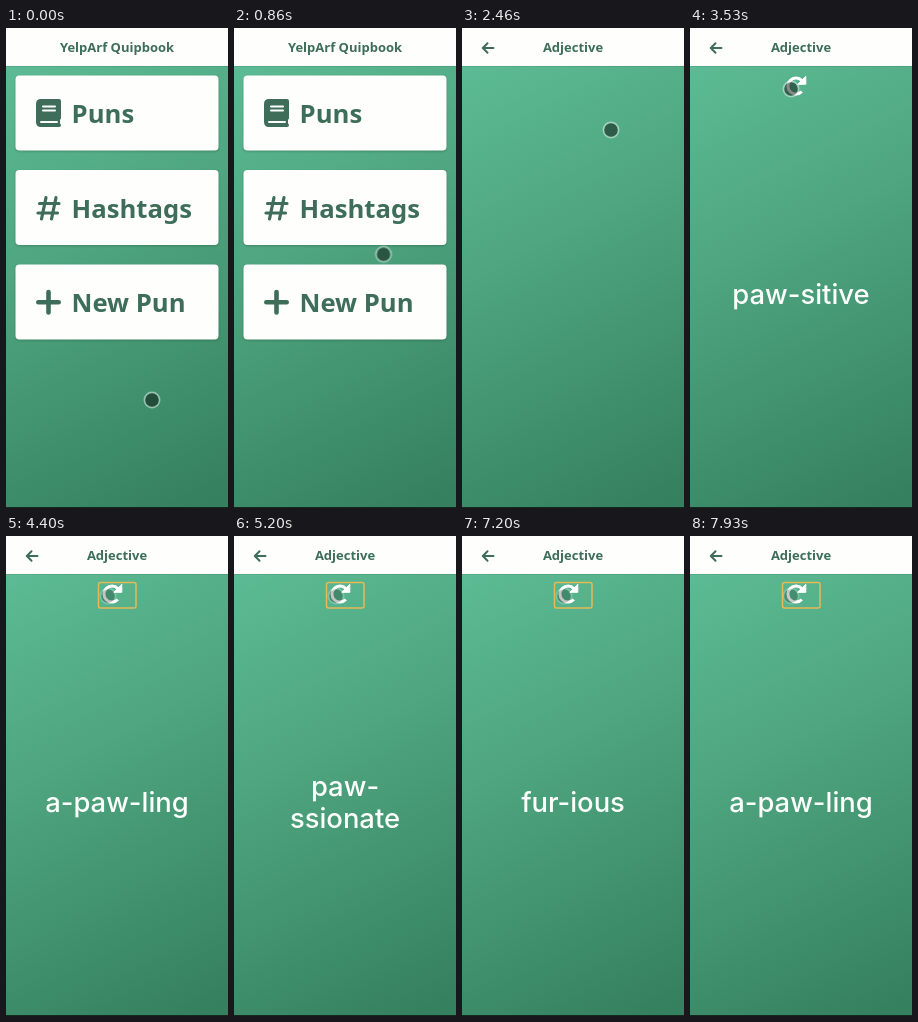
An HTML page that plays this animation: 222 px wide and 480 px high, repeating every 8000 ms.

```html
<!DOCTYPE html>
<html lang="en">
<head>
<meta charset="utf-8">
<title>Pun browser</title>
<style>
  html, body { margin: 0; width: 100%; height: 100%; overflow: hidden; }
  body { background: linear-gradient(153deg, #5dbd96 3%, #4fa680 42%, #35805f 97%); }
  svg { display: block; width: 100%; height: 100%; }
  .title, .label { font-family: "Noto Sans", sans-serif; font-weight: 700; fill: #3e6e59; }
  .title { font-size: 13px; text-anchor: middle; }
  .label { font-size: 25.7px; }
  .word { font: 500 27.4px Inter, sans-serif; fill: #fdfffd; text-anchor: middle; }
  .card { fill: #fefffc; filter: drop-shadow(0 1px 1px #0003); }
  .solid { fill: #3e6e59; }
  .line { fill: none; stroke: #3e6e59; stroke-linecap: round; stroke-linejoin: round; }
</style>
</head>
<body>
<svg id="stage" viewBox="0 0 222 480">
  <defs>
    <g id="book">
      <path class="solid" d="M35 71H53q2 0 2 2V90q0 1-1 1.700v4q1 .3 1 1.600q0 1.700-2 1.700H35q-5 0-5-5V76q0-5 5-5Z"/>
      <path d="M37 78.500H49M37 82.500H49M35 94H51" fill="none" stroke="#fefffc" stroke-width="2" stroke-linecap="round"/>
    </g>
    <path id="hash" class="line" stroke-width="3.200" d="M40 169.500L35.500 191M50 169.500L45.500 191M33.500 175.500H53M32 185H51.500"/>
    <path id="plus" class="line" stroke-width="4.600" d="M42.500 264V284.500M32.300 274.200H52.700"/>
    <path id="back" class="line" stroke-width="2" d="M31.500 20H21M25.500 15.300L20.800 20L25.500 24.700"/>
  </defs>
  <rect width="222" height="38" fill="#fefffc"/>
  <path d="M0 38.300H222" stroke="#0002" stroke-width=".8"/>
  <path d="M0 479.500H222" stroke="#12291f"/>
  <g id="home"></g>
  <g id="list"></g>
  <g id="detail"></g>
  <g id="pun">
    <path d="M111.800 52.600A8 8 0 1 0 111.800 63.500" fill="none" stroke="#fff" stroke-width="3"/>
    <path d="M115.800 48.300V56.300H107.600Z" fill="#fff" stroke="#fff" stroke-linejoin="round"/>
  </g>
  <rect id="focus" x="92.500" y="46.500" width="37.500" height="25.500" rx="2" fill="none" stroke="#e6b955" stroke-width="1.500"/>
  <g id="words"></g>
  <g id="cursor">
    <circle r="7" fill="#000" fill-opacity=".46"/>
    <circle r="7.600" fill="none" stroke="#fff" stroke-opacity=".45" stroke-width="1.700"/>
  </g>
</svg>
<script>
const LOOP = 8000;
const CARD_STEP = 94.5;
const $ = id => document.getElementById(id);

const title = text => `<text class="title" x="111" y="24">${text}</text>`;
const icon = id => `<use href="#${id}"/>`;

const card = (text, row, x) => `
  <rect class="card" x="9.5" y="${47.5 + row * CARD_STEP}" width="203" height="75" rx="4"/>
  <text class="label" x="${x}" y="${95 + row * CARD_STEP}">${text}</text>`;

const cards = (labels, x) => labels.map((text, row) => card(text, row, x)).join("");

$("home").innerHTML = title("YelpArf Quipbook") + cards(["Puns", "Hashtags", "New Pun"], 65.5)
  + ["book", "hash", "plus"].map(icon).join("");
$("list").innerHTML = title("Puns") + icon("back") + cards(["Adjective", "Noun", "Phrase"], 28.5);
$("detail").innerHTML = title("Adjective") + icon("back");

// frames: [time, properties, easing]
function play(el, frames) {
  el.animate(
    frames.map(([time, props, easing = "linear"]) => ({ offset: time / LOOP, easing, ...props })),
    { duration: LOOP, iterations: Infinity }
  );
}

// Visible from start to end with hard cuts.
function show(el, start, end = LOOP) {
  const frames = [[0, { opacity: +(start === 0) }, "step-end"]];
  if (start > 0) frames.push([start, { opacity: 1 }, "step-end"]);
  if (end < LOOP) frames.push([end, { opacity: 0 }, "step-end"]);
  frames.push([LOOP, { opacity: +(end === LOOP) }]);
  play(el, frames);
}

show($("home"), 0, 1330);
show($("list"), 1330, 2330);
show($("detail"), 2330);
show($("pun"), 2530);
show($("focus"), 3730);

const words = [
  [2530, "paw-sitive"],
  [3730, "a-paw-ling"],
  [4530, "paw-", "ssionate"],
  [5330, "paw-sitive"],
  [6060, "pup-ular"],
  [6730, "fur-ious"],
  [7330, "a-paw-ling"]
];
words.forEach(([start, ...lines], i) => {
  const group = document.createElementNS("http://www.w3.org/2000/svg", "g");
  const top = 276 - (lines.length - 1) * 16;
  group.innerHTML = lines.map((text, n) =>
    `<text class="word" x="111" y="${top + n * 32}">${text}</text>`).join("");
  $("words").append(group);
  show(group, start, words[i + 1]?.[0]);
});

const at = (x, y) => ({ transform: `translate(${x}px, ${y}px)` });
play($("cursor"), [
  [0, at(146, 372)],
  [660, at(146, 372), "ease-in-out"],
  [1060, at(153, 83)],
  [2060, at(153, 83), "ease-in-out"],
  [2460, at(149, 102)],
  [2860, at(149, 102), "ease-in-out"],
  [3530, at(101, 61)],
  [3660, at(102, 60)],
  [7800, at(102, 60), "step-end"],
  [7860, at(101, 60)],
  [LOOP, at(101, 60)]
]);

const taps = [[4400, 4730], [5200, 5530], [5930, 6200], [6600, 6930], [7200, 7460]];
const fade = [[0, { opacity: 1 }], [3660, { opacity: 1 }], [3760, { opacity: 0 }]];
for (const [start, end] of taps) {
  fade.push(
    [start, { opacity: 0 }],
    [start, { opacity: 0.5 }],
    [start + 130, { opacity: 0.8 }],
    [end, { opacity: 0 }]
  );
}
fade.push([7860, { opacity: 0 }], [7860, { opacity: 0.3 }], [LOOP, { opacity: 0.6 }]);
play($("cursor"), fade);
</script>
</body>
</html>
```
